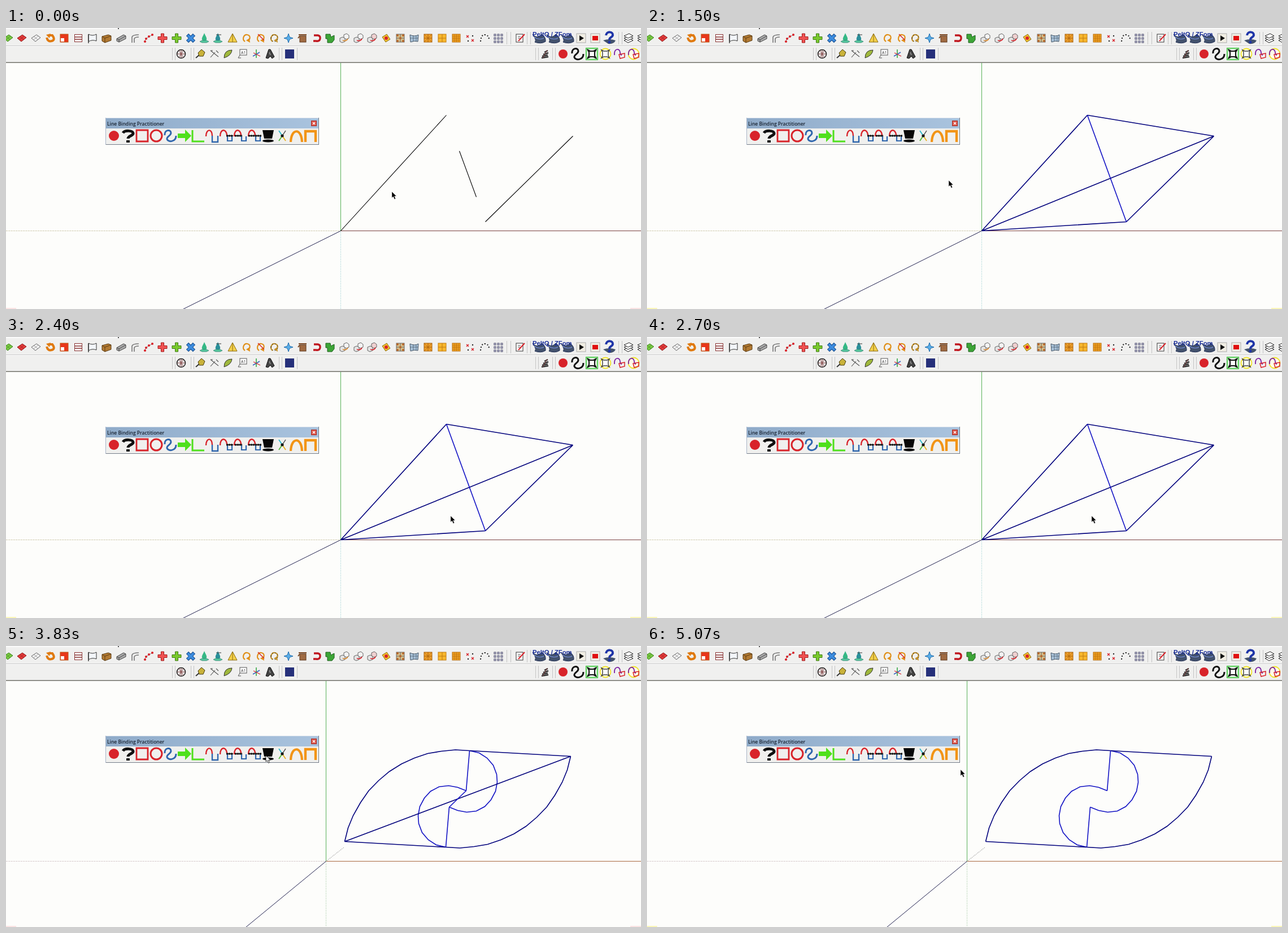
These frames come from a looping animation (1124 px wide and 498 px high, 5110 ms). An HTML page:

```html
<!DOCTYPE html>
<html lang="en">
<head>
<meta charset="utf-8">
<title>Edge joining demo</title>
<style>
html, body { margin: 0; width: 100%; height: 100%; overflow: hidden; background: #fdfdfb; }
svg { display: block; }
text { font-family: "Open Sans", sans-serif; }
</style>
</head>
<body>
<svg id="stage" width="1124" height="498" viewBox="0 0 1124 498"></svg>
<script>
const LOOP = 5110;
const RED = '#d8232a', BLUE = '#2f66ad', ORANGE = '#f29416', GREEN = '#4fe01c', INK = '#222',
      NAVY = '#00007c', BRIGHT = '#1212c4', GOLD = '#e8b020';

// drawing helpers
const path = (d, fill = 'none', stroke = 'none', w = 1) =>
  `<path d="${d}" fill="${fill}" stroke="${stroke}" stroke-width="${w}"/>`;
const line = (d, stroke, w = 1) => path(d, 'none', stroke, w);
const dashed = (d, stroke, dash, w = 1) =>
  `<path d="${d}" fill="none" stroke="${stroke}" stroke-width="${w}" stroke-dasharray="${dash}"/>`;
const rect = (x, y, w, h, fill, stroke = 'none') =>
  `<rect x="${x}" y="${y}" width="${w}" height="${h}" fill="${fill}" stroke="${stroke}"/>`;
const disc = (x, y, r, fill, stroke = 'none', w = 1) =>
  `<circle cx="${x}" cy="${y}" r="${r}" fill="${fill}" stroke="${stroke}" stroke-width="${w}"/>`;
const text = (x, y, size, fill, str, extra = '') =>
  `<text x="${x}" y="${y}" font-size="${size}" fill="${fill}" ${extra}>${str}</text>`;
const dots = (pts, r, fill) => pts.map(([x, y]) => disc(x, y, r, fill)).join('');
const at = (x, y, ...parts) => `<g transform="translate(${x} ${y})">${parts.join('')}</g>`;
const group = (id, body) => `<g id="${id}">${body}</g>`;

const diamond = (fill, edge) =>
  path('M-8 0L1-6L8-1L-1 6Z', fill, edge) + line('M-4-3L4 3M-4 3L4-4', edge, .6);
const grid = (fill, edge) =>
  rect(-7, -7, 14, 14, fill, edge) + line('M-7 0H7M0-7V7', edge);
const plus = (fill, edge) => path('M-2.5-8h5v5.5h5.5v5h-5.5V8h-5V2.5H-8v-5h5.5Z', fill, edge);
const drop = fill => path('M0-9C2-4 5-1 4 3Q0 6-4 3C-5-1-2-4 0-9Z', fill) +
  path('M-8 6L-4 4H4L8 6L4 8H-4Z', '#58c9a0', '#176b5a', .6);
const loop = color => line('M-3 6C-9 2-5-7 1-6S7 2 2 4', color, 2.2) + path('M5 0L6 8L-1 4Z', color);
const boxes = (fill, edge) => path('M-8 0L-3-2L1 0V6L-4 8L-8 6Z', '#e4e4e4', '#444', .8) +
  path('M-1-6L4-8L8-5V0L3 2L-1-1Z', fill, '#444', .8) + line('M-3 4Q4 6 6 1', edge, 1.8);
const shoe = path('M-11-7C-5 0 1-2 5-7Q13-2 12 6Q4 11-7 7Q-3 4-11-7Z', '#43526d', '#1d2b50') +
  line('M-8-2Q0 4 9 0', '#6f86c8', 1.4);
const layers = [4, 0, -4].map(y => path(`M-8 ${y}L1 ${y - 4}L8 ${y}L-1 ${y + 4}Z`, '#fff', '#222')).join('');
const swirl = color => line('M-10-1C-11-11 1-12 1-5C1 0-7 1-6 6C-4 12 10 11 10 0', color, 3);

function topRow() {
  const row = [
    [4, diamond('#7ac943', '#39801c')], [28, diamond('#e33b3b', '#8d1919')],
    [53, diamond('#f5f5f5', '#666')],
    [79, line('M-7-1Q-5 7 2 5T3-5H-3', '#e07a10', 4) + path('M-8-6L0-8L-2 0Z', '#e07a10')],
    [103, rect(-7, -7, 14, 14, '#e8371b', '#b51') + rect(-6, 0, 6, 6, '#fff')],
    [128, rect(-6.5, -6.5, 13, 13, '#fff', '#833') + line('M-6-2H6M-6 2H6', '#833', 1.5)],
    [153, path('M-7-7Q0-3 7-7V5Q0 2-7 6Z', '#f3f6fa', '#333') + line('M-7-7V9', '#333', 1.4)],
    [178, path('M-8-3L3-6L8-4V4L-3 8L-8 5Z', '#b27a32', '#5b3a12') + line('M-8-3L-3 0V8M-3 0L8-4', '#5b3a12')],
    [204, path('M-8 1L4-6L8-4V1L-4 7L-8 5Z', '#aaa', '#444') + line('M-8 1L-4 3V7M-4 3L8-4', '#444')],
    [228, line('M-5 8V-2Q-4-6 7-6M-1 8V1Q0-2 7-2', '#777', 1.6)],
    [252, line('M-7 6L-3 0L2-3L7-6', '#888') + dots([[-6, 6], [-4, 1], [1, -3], [7, -6]], 2.1, RED)],
    [277, plus('#ef5252', '#a31818')], [302, plus('#79c92d', '#3f7a13')],
    [327, `<g transform="rotate(45)">${plus('#3d8de0', '#174f91')}</g>`],
    [351, drop('#35b885')], [375, drop('#2a8f9a') + line('M-3-6H6', '#333')],
    [401, path('M0-8L8 7H-8Z', '#f3d04a', '#8a6a10') + line('M0-8V7', '#8a6a10')],
    [426, loop('#e0901a')], [451, loop('#e0901a') + line('M-5-7L6 4', RED, 1.4)],
    [475, loop('#c9962c') + dashed('M-6 0A6 6 0 0 1 6 0A6 6 0 0 1-6 0', '#222', '2 3')],
    [500, path('M0-8L2-2L8 0L2 2L0 8L-2 2L-8 0L-2-2Z', '#5aaee8', '#246fae')],
    [525, rect(-5, -4, 11, 11, '#a06a42', '#5a3519') + line('M-7-6H7M-5-4L-8 0', '#7c4a25', 2)],
    [550, line('M-5-5H2Q7-4 6 1T-1 5H-6', '#c01820', 3.4)],
    [574, path('M-8-7H0L1-2L7-5V3L3 8H-5V1H-8Z', '#3da537', '#1c5f1c')],
    [599, boxes('#f3f3f3', '#d98a30')], [624, boxes('#f3f3f3', RED)], [648, boxes('#efd0d0', RED)],
    [673, path('M-7-2L1-7L7 2L-1 7Z', '#f2c12e', '#8a6a10') + disc(0, 0, 3, RED)],
    [698, grid('#d9c08a', '#666') + dots([[-5, -5], [5, -5], [0, 0], [-5, 5], [5, 5]], 2, '#b6652a')],
    [723, path('M-8-6Q0-2 7-6L6 6Q0 4-7 7Z', '#a9c2d8', '#456') + line('M-7 0H7M-2-5V6M3-5V5', '#456', .7)],
    [747, grid('#efa02a', '#a8600c') + line('M-7-7L7 7M-7 7L7-7', '#a8600c', .7)],
    [772, grid('#f8b72c', '#c07a10')],
    [797, grid('#f5a623', '#b86c0c') + line('M-7-3.5H7M-7 3.5H7M-3.5-7V7M3.5-7V7', '#b86c0c', .7)],
    [822, line('M-7-5l4 4m0-4l-4 4M2 2l4 4m0-4l-4 4', RED, 1.4) + dots([[4, -4], [-4, 5]], 1.2, INK)],
    [847, dashed('M-7 6Q-6-7 1-6T8 3', '#222', '2 3', 2)],
    [871, [-7, -1, 5].map(x => [-7, -1, 5].map(y => rect(x, y, 3, 3, '#dde', '#446')).join('')).join('')],
    [910, rect(-7, -7, 12, 14, '#fff', '#333') + line('M-4-3H1M-4 0H0', '#555') + line('M-3 5L8-7', RED, 2)],
    [943, shoe], [968, shoe], [993, shoe],
    [1018, rect(-8, -8, 16, 16, '#f1eee4', '#aaa') + path('M-3-5L5 0L-3 5Z', '#111')],
    [1043, rect(-8, -8, 16, 16, '#f1eee4', '#aaa') + rect(-5, -4, 10, 8, '#e01010')],
    [1068, path('M-11 4Q0 0 11 4Q8 11-2 10Z', '#43526d') +
      line('M-6-5C-5-13 7-12 6-5C5-1 0-2 0 3', '#1f35a8', 4) + disc(0, 7, 2.4, '#1f35a8')],
    [1102, layers], [1126, layers]
  ];
  return row.map(([x, art]) => at(x, 18, art)).join('') +
    text(932, 15, 11.3, '#1a2f9a', 'PeltQ / ZFom', 'style="font-family:\'Liberation Sans\',sans-serif;font-weight:700"');
}

function secondRow() {
  const curl = line('M-9 2C-10-10 0-11 1-3Q1 2 4 2', '#7a1fa0', 1.8) + path('M-1 1L9-1V6L1 8Z', 'none', RED, 1.5);
  const ring = disc(0, 0, 9.5, '#fffde8', '#f0e22a', 1.8);
  const knot = (color, w) => path('M-7-7L-3-5H3L7-7L5-3V3L7 7L3 5H-3L-7 7L-5 3V-3Z', '#fff', color, w);
  const row = [
    [310, disc(0, 0, 7.5, '#eee', '#222', 1.6) + line('M-7 0H7M0-7V7M-4-6Q2 0-4 6M4-6Q-2 0 4 6', '#733', .9)],
    [344, line('M-8 7L-1 1', '#333', 2) + path('M-4-2L2-8L8-3L5 4L-2 4Z', '#c9b23a', '#443a10')],
    [369, line('M-7-6L7 5M-7 6L1-3M-7-6h4M3-6L7-2', '#555', 1.1)],
    [393, path('M-7 7Q-7-7 7-7Q6 3-7 7Z', '#9fb83c', '#333')],
    [419, rect(-5, -8, 12, 10, '#fff', '#555') + line('M-5 2L-8 7H-3', '#555') + text(-3, 0, 7, '#333', 'A1')],
    [443, line('M0-8V7', '#2aa53a', 1.5) + line('M-6 4L6-3', '#3465c0', 1.5) + line('M-5-2L7 4', RED, 1.2)],
    [467, path('M-7 7L-2-8H1L8 5L4 8L1 4L-3 8Z', '#444', '#111') + line('M-1-3L1 2', '#999', 1.5)],
    [502, rect(-8, -8, 16, 16, '#26307a')],
    [954, line('M-6 7L6 5M-5 4L5 2M-3 1L6-2M-1-3L5-6', '#333', 2.4) + line('M-4 7L4-7', '#844', 1)],
    [986, disc(0, 0, 8, RED)],
    [1012, swirl('#111')],
    [1037, rect(-10.5, -10.5, 21, 21, '#fff', '#35c435') + rect(-9, -9, 18, 18, 'none', '#35c435') + knot('#111', 2.2)],
    [1061, ring + knot('#444', 1.5)],
    [1086, curl], [1111, ring + curl]
  ];
  return row.map(([x, art]) => at(x, 46, art)).join('');
}

function bars() {
  const grips = (list, y) => list.map(x => line(`M${x}.5 ${y}v22`, '#c4c4c4')).join('');
  return rect(0, 0, 1124, 61, '#f0f0ef') + rect(0, 0, 1124, 2, '#fbfbfb') + rect(198, 0, 2, 2, '#555') +
    rect(0, 31, 1124, 1, '#c9c9c9') + rect(0, 32, 1124, 1, '#fcfcfc') +
    rect(0, 60, 1124, 1, '#a9a9a5') + rect(0, 61, 1124, 1, '#77776f') +
    grips([886, 893, 922, 928, 1084, 1090], 7) + grips([294, 299, 327, 332, 483, 488, 515, 937, 942, 967, 972], 35) +
    topRow() + secondRow();
}

function panel() {
  const wave = line('M-11 1C-11-13 0-13 0 0', RED, 2.4) + line('M0 0V11H10V0', BLUE, 2.4);
  const chain = (from, to) => line('M-11 1C-11-13 0-13 1-1', RED, 2.4) + line('M2 1V9H10V1', BLUE, 2.2) +
    line(`M${from} 0H${to}`, '#111', 1.6) + dashed(`M${from} 0H${to}`, '#111', '3 1', 3.2);
  const row = [
    [191, disc(0, 0, 9, RED)],
    [216, line('M-9-5C-6-10 9-10 9-4C9 0 0 0 0 5', '#111', 5) + path('M-3 8h6v4h-6Z', '#111')],
    [241, line('M-10-10H10V10H-10Z', RED, 2.8)],
    [266, disc(0, 0, 10, 'none', RED, 3)],
    [291, swirl(BLUE)],
    [316, path('M-12-4H1V-11L12 0L1 11V4H-12Z', GREEN)],
    [340, line('M-10-10V10H11', GREEN, 3)],
    [365, wave], [390, chain(0, 12)], [415, chain(-10, 3)], [440, chain(-11, 12)],
    [464, path('M-10-10H10L7 5H-7Z', '#080808') + `<ellipse cy="9" rx="10" ry="2.6" fill="#080808"/>`],
    [489, line('M-6-9L0 0', '#28b5c8', 1.8) + line('M0 0L6 9', GOLD, 1.8) + line('M6-9L0 0', '#555', 1.4) +
      line('M0 0L-6 9', '#53b83a', 1.8) + disc(0, 0, 2.6, '#111')],
    [514, line('M-10 11C-9-14 9-14 10 11', ORANGE, 4.2)],
    [539, line('M-9 11V-8H9V11', ORANGE, 4.4)]
  ];
  return rect(176, 159, 378, 48, '#f0f0ee') + rect(176, 159, 378, 1, '#d5dfeb') +
    rect(177, 160, 376, 18, 'url(#bar)') + rect(176, 206, 378, 1, '#747c88') +
    rect(553, 159, 1, 48, '#747c88') + rect(176, 159, 1, 48, '#aab6c6') +
    text(179, 172.8, 8.5, '#16202e', 'Line Binding Practitioner', 'font-weight="600"') +
    rect(540.5, 164.5, 9, 9, '#dc5348', '#a3322a') + line('M543 167l4 4m0-4l-4 4', '#fff', 1.2) +
    row.map(([x, art]) => at(x, 191, art)).join('');
}

function axes(x, y, redAxis, leftDots, downDots, foot) {
  return `<g shape-rendering="crispEdges">` +
    line(`M${x}.5 62V${y}`, '#58b058') + line(`M${x} ${y}.5H1124`, redAxis) +
    dashed(`M0 ${y}.5H${x}`, leftDots, '1 2') + dashed(`M${x}.5 ${y}V498`, downDots, '1 2') +
    `</g>` + line(`M${x}.5 ${y}.5L${foot} 498`, '#23234f');
}

// first model: three loose edges, then joined
const A = '592.5 359.5', B = '779.5 154.5', C = '1003.5 191.5', D = '848.5 343.5';
const seg = (a, b) => `M${a}L${b}`;
const stub = seg('802.5 218', '832.5 299.5');
const loose = seg(A, B) + seg(C, D);

// second model: one spiral and its half-turn copy
const outer = '599,346 605,322 614,300 627,277 641.5,256 659,238 678,222 699.5,208.5 722.5,198 746,190 770,186 795,183.5 820,185';
const inner = '820,185 837,189 851,198 862,211 868,227 869,241 866,257 858,272 847,284 832,292 815,294 799,291 784,285';
const arc = (pts, c, w) => `<polyline points="${pts}" fill="none" stroke="${c}" stroke-width="${w}"/>`;
const twin = body => at(.5, .5, body, `<g transform="rotate(180 799 270.5)">${body}</g>`);
const spirals = (c1, c2, w) => twin(arc(outer, c1, w) + arc(inner, c2, w));

const corners = c => rect(0, 496, 18, 2, c) + rect(1105, 496, 19, 2, c);

const stage = document.getElementById('stage');
stage.innerHTML =
  `<defs><linearGradient id="bar"><stop stop-color="#8fabc9"/><stop offset="1" stop-color="#a9c3de"/></linearGradient></defs>` +
  rect(0, 0, 1124, 498, '#fdfdfb') +
  group('pink', corners('#fbe3e3')) + group('yellow', corners('#fbf7b8')) +
  group('view1', axes(592, 359, '#7a4040', '#9a8f55', '#7cc0c4', 314)) +
  group('view2', axes(566, 381, '#a9673f', '#a58a90', '#86b886', 425) +
    dashed('M566 382L598 357', '#444', '1 2')) +
  group('plain1', line(loose + stub, '#000', 1.1)) +
  group('picked1', line(loose, NAVY, 1.6) + line(stub, BRIGHT, 1.6)) +
  group('joined1', line(loose + seg(B, C) + seg(D, A) + seg(A, C), NAVY, 1.6) + line(seg(B, D), BRIGHT, 1.6)) +
  group('plain2', spirals('#000', '#000', 1.1)) +
  group('picked2', spirals(NAVY, BRIGHT, 1.6)) +
  group('links2', twin(line('M599 346L778 356', NAVY, 1.6) + line('M820 185L814 256', BRIGHT, 1.6))) +
  group('cross2', at(.5, .5, line('M599 346L999 195', NAVY, 1.6) + line('M784 285L814 256', BRIGHT, 1.6))) +
  bars() + panel() +
  group('cursor', path('M0 0V11L2.6 8.8L4.6 13.4L6.6 12.5L4.6 8.1H8Z'));

// [layer, from, until] in ms
const shows = [
  ['plain1', 0, 530], ['picked1', 530, 1130], ['joined1', 1130, 2730], ['view1', 0, 2730],
  ['view2', 2730, LOOP], ['plain2', 2730, 2900], ['picked2', 2900, LOOP],
  ['links2', 3330, LOOP], ['cross2', 3330, 4480],
  ['yellow', 1130, 2730], ['yellow', 4480, LOOP], ['pink', 0, 1130], ['pink', 2730, 4480]
];
// pointer stops: [ms, x, y]
const stops = [
  [0, 683, 290], [560, 683, 290], [900, 498, 209], [1060, 461, 197], [1200, 461, 197],
  [1500, 534, 270], [1700, 585, 290], [2400, 787, 317], [2730, 787, 317], [3070, 459, 200],
  [3330, 460, 196], [3830, 460, 194], [3950, 460, 194], [4300, 487, 193], [4530, 487, 193],
  [4930, 555, 219], [LOOP, 555, 219]
];
const layer = Object.fromEntries([...stage.querySelectorAll('g[id]')].map(g => [g.id, g]));
const arrow = layer.cursor.firstChild;

function draw(t) {
  const on = new Set(shows.filter(([, a, b]) => t >= a && t < b).map(s => s[0]));
  for (const [id] of shows) layer[id].style.display = on.has(id) ? '' : 'none';

  const i = stops.findIndex((s, n) => n && t < s[0]);
  const [t0, x0, y0] = stops[i - 1], [t1, x1, y1] = stops[i];
  const k = (t - t0) / (t1 - t0), e = k * k * (3 - 2 * k);
  const x = x0 + (x1 - x0) * e, y = y0 + (y1 - y0) * e;
  layer.cursor.setAttribute('transform', `translate(${x.toFixed(1)} ${y.toFixed(1)})`);
  const overPanel = x > 176 && x < 554 && y > 159 && y < 207;
  arrow.setAttribute('fill', overPanel ? '#fff' : '#000');
  arrow.setAttribute('stroke', overPanel ? '#222' : '#fff');
  arrow.setAttribute('stroke-width', overPanel ? .9 : .4);
}

const start = performance.now();
function tick() {
  draw((performance.now() - start) % LOOP);
  requestAnimationFrame(tick);
}
tick();
</script>
</body>
</html>
```
